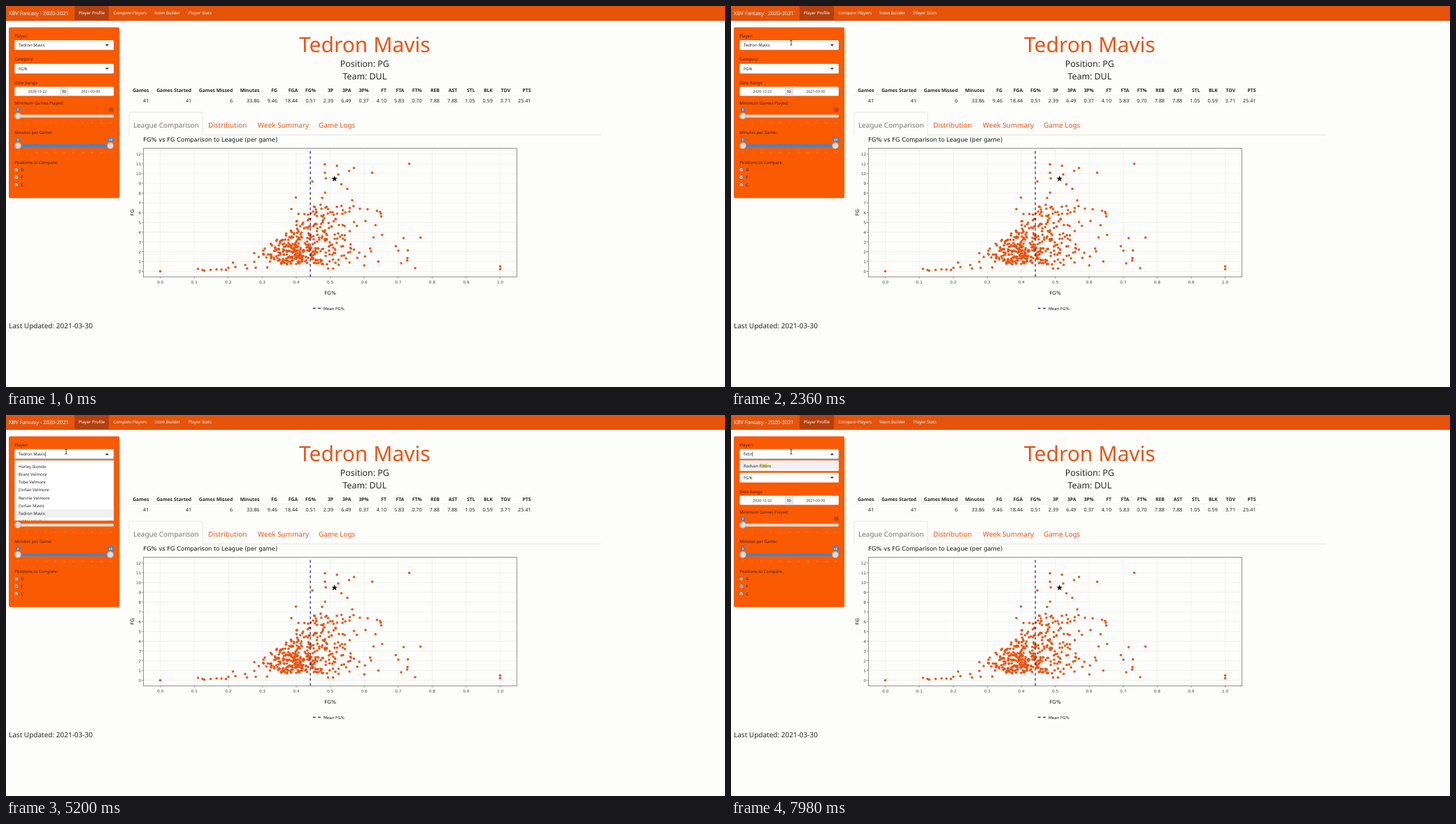
Write an HTML page that moves like this. It is 1028 px wide and 545 px high and loops after 8 s.

```html
<!DOCTYPE html>
<html lang="en">
<head>
<meta charset="utf-8">
<title>Player dashboard</title>
<style>
  html, body { margin: 0; width: 100%; height: 100%; overflow: hidden; background: #fdfdfc; }
  svg { display: block; width: 100%; height: 100%; }
  text { font-family: "Noto Sans", "Open Sans", sans-serif; text-rendering: geometricPrecision; white-space: pre; }
  .chart text { font-family: "DejaVu Sans", Verdana, sans-serif; }
</style>
</head>
<body>
<svg id="stage" viewBox="0 0 1028 545" preserveAspectRatio="none"></svg>
<script>
const LOOP = 8000;
const INK = '#262626', ORANGE = '#ea5412', PANEL = '#fa5a02', BLUE = '#3b87cf', LABEL = '#3c2212';
const NAME = 'Tedron Mavis', MATCH = 'Rodvan Fittiro', QUERY = 'fittir';
const stage = document.getElementById('stage');

function el(parent, tag, attrs = {}, content) {
  const node = document.createElementNS('http://www.w3.org/2000/svg', tag);
  for (const key in attrs) node.setAttribute(key, attrs[key]);
  if (content !== undefined) node.textContent = content;
  parent.appendChild(node);
  return node;
}
const group = (parent, attrs) => el(parent, 'g', attrs);
const rect = (parent, x, y, width, height, fill, more) =>
  el(parent, 'rect', { x, y, width, height, fill, ...more });
const line = (parent, x1, y1, x2, y2, stroke, more) =>
  el(parent, 'line', { x1, y1, x2, y2, stroke, ...more });
const text = (parent, x, y, size, content, fill = INK, anchor = 'start', more) =>
  el(parent, 'text', { x, y, 'font-size': size, fill, 'text-anchor': anchor, ...more }, content);
const show = (node, on) => node.setAttribute('display', on ? 'inline' : 'none');

function seeded(seed) {
  return () => {
    seed = (seed * 1664525 + 1013904223) % 4294967296;
    return seed / 4294967296;
  };
}

function drawNavbar() {
  const g = group(stage);
  rect(g, 0, 0, 1028, 21, '#e6530b');
  rect(g, 0, 20.3, 1028, 0.9, '#cb460e');
  rect(g, 98, 0, 49, 20.5, '#b4400f');
  text(g, 4, 13, 7.5, 'XBV Fantasy - 2020-2021', '#fff');
  [[104, 'Player Profile'], [153.5, 'Compare Players'], [212, 'Team Builder'], [261, 'Player Stats']]
    .forEach(([x, label]) => text(g, x, 12.4, 6, label, '#fff'));
}

function drawSlider(g, y, max, full) {
  const badge = { rx: 1 };
  rect(g, 12, y - 1.8, 142, 4, full ? BLUE : '#eadfd9', { rx: 1.5 });
  rect(g, 14.8, y - 12, 4.6, 6.4, BLUE, badge);
  text(g, 17.1, y - 7, 4.6, '0', '#fff', 'middle');
  rect(g, full ? 145.2 : 147, y - 12, full ? 8.6 : 7, 6.4, full ? BLUE : '#cf5019', badge);
  text(g, full ? 149.5 : 150.5, y - 7, 4.6, max, full ? '#fff' : '#7b3414', 'middle');
  for (let i = 0; i <= 10; i++) {
    const x = 17 + i * 13.25;
    line(g, x, y + 5, x, y + 7.3, '#d8713c', { 'stroke-width': 0.5 });
    text(g, x, y + 11.3, 3.6, Math.round(max * i / 10), '#d98a62', 'middle');
  }
  (full ? [17, 149.2] : [17]).forEach(cx =>
    el(g, 'circle', { cx, cy: y, r: 4.5, fill: '#dcdcda', stroke: '#a9a5a2', 'stroke-width': 0.6 }));
}

function drawSidebar() {
  const g = group(stage);
  rect(g, 4, 30.4, 158.2, 244.4, PANEL, { rx: 2 });
  [[44.6, 'Player:'], [78, 'Category:'], [111.5, 'Date Range'], [141, 'Minimum Games Played:'],
   [183.2, 'Minutes per Game:'], [225.6, 'Positions to Compare:']]
    .forEach(([y, label]) => text(g, 12.2, y, 6, label, LABEL));
  rect(g, 12.3, 82.8, 141.7, 13.8, '#fff', { rx: 1.6 });
  text(g, 18, 91.9, 6, 'FG%');
  el(g, 'path', { d: 'M142 88.4h5l-2.5 2.7z', fill: INK });
  rect(g, 12.3, 115.6, 141.7, 13, '#fff', { rx: 1.6 });
  rect(g, 77.3, 115.6, 11.6, 13, '#e9e7e6', { stroke: '#cfcac6', 'stroke-width': 0.4 });
  text(g, 44.8, 124, 5.1, '2020-12-22', INK, 'middle');
  text(g, 83.1, 124, 6, 'to', INK, 'middle');
  text(g, 121, 124, 5.1, '2021-03-30', INK, 'middle');
  drawSlider(g, 157.3, 35, false);
  drawSlider(g, 199.7, 48, true);
  ['G', 'F', 'C'].forEach((label, i) => {
    const y = 231.9 + i * 10.7;
    rect(g, 12.6, y, 4.3, 4.3, '#fff', { rx: 0.7, stroke: '#5a4a42', 'stroke-width': 0.4 });
    el(g, 'path', { d: `M13.5 ${y + 2.2}l1 1.1l1.7-2.3`, fill: 'none', stroke: '#111', 'stroke-width': 0.8 });
    text(g, 21.3, y + 4.2, 5.8, label, LABEL);
  });
}

function drawProfile() {
  const g = group(stage);
  text(g, 512.8, 66, 30, NAME, ORANGE, 'middle');
  text(g, 512.8, 87, 12.4, 'Position: PG', INK, 'middle');
  text(g, 512.8, 105.4, 12.4, 'Team: DUL', INK, 'middle');
  const heads = 'Games,Games Started,Games Missed,Minutes,FG,FGA,FG%,3P,3PA,3P%,FT,FTA,FT%,REB,AST,STL,BLK,TOV,PTS'.split(',');
  const values = '41 41 6 33.86 9.46 18.44 0.51 2.39 6.49 0.37 4.10 5.83 0.70 7.88 7.88 1.05 0.59 3.71 25.41'.split(' ');
  const edges = [204.3, 265.2, 324.2, 362.4, 388, 417.2];
  heads.forEach((head, i) => {
    const x = i < 6 ? edges[i] : i === 18 ? 750.4 : 442.8 + (i - 6) * 25.3;
    text(g, x, 122.6, 6.8, head, INK, 'end', { 'font-weight': 700 });
    text(g, x, 138, 7.2, values[i], INK, 'end');
  });
  line(g, 176, 127.6, 755, 127.6, '#f0efed', { 'stroke-width': 0.7 });
  el(g, 'path', {
    d: 'M281 184.5H850.5M176 184.5V154q0-2 2-2H279q2 0 2 2V184.5',
    fill: 'none', stroke: '#dfe0e1', 'stroke-width': 0.8
  });
  [[182, 'League Comparison', '#797673'], [289, 'Distribution', ORANGE],
   [360, 'Week Summary', ORANGE], [447, 'Game Logs', ORANGE]]
    .forEach(([x, label, fill]) => text(g, x, 174.4, 9.95, label, fill));
  text(g, 4, 460.6, 10, 'Last Updated: 2021-03-30');
}

// Highest dot (smallest y) allowed at a given x inside the crowd.
function crowdTop(x) {
  if (x < 400) return 354 - (x - 352) * 0.78;
  if (x < 456) return 316 - (x - 400) * 1.32;
  if (x < 480) return 243 + (x - 456) * 0.7;
  return 260 + (x - 480) * 1.15;
}

function drawDots(g) {
  const edge = [
    220.5,379.5, 706.5,372.5, 706.5,376.5, 576.5,225.7, 523.6,238.5, 456,226.5, 473.2,228.6, 490.5,236,
    497.5,231.7, 456,238.6, 475,241, 592.6,331.3, 568.5,332, 557.4,343.6, 574.6,349.6, 561,350,
    574,360.6, 573.6,364, 565,368, 585,375, 530.4,293, 534.8,294.5, 536,297, 536.5,301,
    517,290.7, 506,290, 491,294, 491.5,289, 479.5,286, 495,278, 488,261.5, 479.5,255,
    537.8,327.5, 525.5,331, 528.3,313.5, 514,307.5, 497.5,309, 512.3,371, 532.3,365.6, 460.5,375.5,
    467.6,375.5, 274.5,376, 281,377.4, 283.4,378.4, 292.6,377.6, 301,376.8, 308,377, 314.5,377.6,
    318,374.4, 324.6,367, 328,373.6, 342,370.6, 344.6,375.6, 355,353.4, 355,366, 357,374.4,
    368,350, 370,347, 368.5,355.5, 373.5,374, 386.5,336, 414.5,274, 408,290.5, 438,251
  ];
  const random = seeded(2021);
  const dot = (cx, cy) => el(g, 'circle', { cx: cx.toFixed(1), cy: cy.toFixed(1), r: 1.75 });
  for (let i = 0; i < edge.length; i += 2) dot(edge[i], edge[i + 1]);
  for (let count = 0; count < 385;) {
    const bell = random() + random() + random() + random() - 2;
    const x = 427 + bell * (bell > 0 ? 62 : 42), height = random() * Math.sqrt(random());
    if (x < 345 || x > 530) continue;
    dot(x, 371 - random() * 3 - (368 - crowdTop(x)) * height);
    count++;
  }
}

function drawChart() {
  const g = group(stage, { class: 'chart' });
  const px = v => 220.7 + v * 485.8, py = v => 379.5 - v * 13.97;
  text(g, 196.3, 193.8, 8.4, 'FG% vs FG Comparison to League (per game)', '#111');
  for (let i = 0; i <= 10; i++) {
    const x = px(i / 10);
    line(g, x, 204, x, 387, '#ededeb', { 'stroke-width': 0.7 });
    line(g, x, 387.5, x, 389.7, '#555', { 'stroke-width': 0.6 });
    text(g, x, 396.6, 5.7, (i / 10).toFixed(1), '#444', 'middle');
  }
  for (let i = 0; i <= 12; i++) {
    const y = py(i);
    line(g, 197, y, 730, y, '#ededeb', { 'stroke-width': 0.7 });
    line(g, 194, y, 196.4, y, '#555', { 'stroke-width': 0.6 });
    text(g, 193.2, y + 2.1, 5.7, i, '#444', 'end');
  }
  drawDots(group(g, { fill: ORANGE }));
  const dashed = { 'stroke-width': 1.2, 'stroke-dasharray': '3.67' };
  line(g, 435.1, 387.4, 435.1, 204, '#1f1870', dashed);
  const star = Array.from({ length: 10 }, (_, i) => {
    const r = i % 2 ? 1.8 : 4.6, a = i * Math.PI / 5;
    return `${469.7 + r * Math.sin(a)},${247.2 - r * Math.cos(a)}`;
  });
  el(g, 'polygon', { points: star.join(' '), fill: '#000' });
  rect(g, 196.4, 203.6, 534.2, 184, 'none', { stroke: '#777', 'stroke-width': 0.8 });
  text(g, 463.5, 412.8, 7.2, 'FG%', '#111', 'middle');
  text(g, 0, 0, 7, 'FG', '#111', 'middle', { transform: 'translate(182.6 295.3) rotate(-90)' });
  line(g, 438.8, 432.4, 450.4, 432.4, '#1f1870', dashed);
  text(g, 454, 434.5, 5.6, 'Mean FG%', '#111');
}

function makeField() {
  const g = group(stage);
  const box = rect(g, 12.3, 49, 141.7, 13.8, '#fff', { rx: 1.6, 'stroke-width': 0.9 });
  const value = text(g, 18, 58.2, 6, NAME);
  const caret = rect(g, 0, 52.8, 0.6, 6.6, '#111');
  const arrow = el(g, 'path', { fill: INK });
  return { box, value, caret, arrow };
}

function makeRows(parent, names, firstY) {
  const g = group(parent);
  names.forEach((name, i) => text(g, 18, firstY + i * 11.15, 6, name));
  return g;
}

function makeDropdown() {
  const clip = el(el(stage, 'defs'), 'clipPath', { id: 'listClip' });
  rect(clip, 12.3, 65, 141.7, 86, '#000');
  const list = group(stage);
  rect(list, 12.3, 65, 141.7, 86, '#fff');
  const inner = group(list, { 'clip-path': 'url(#listClip)' });
  const active = rect(inner, 12.3, 0, 141.7, 11.2, '#f1f0f2');
  const top = makeRows(inner, ['Gracious Obelumi', 'Kaylor Orven', 'Marlin Orven', 'Tek Olubari',
    'DeWendel Hartwick', 'Jo-Venn Fennimore', 'Dariell Fennimore-Potter', 'Colburn Avery'], 74.7);
  const middle = makeRows(inner, ['Sorel Indrick', 'Harley Ikondo', 'Brant Velmore', 'Tobe Velmore',
    'Corlan Velmore', 'Rennie Velmore', 'Corlan Mavis', NAME, 'JoMont Kellwin'], 64.8);
  const bar = rect(inner, 148.8, 97.4, 4, 13.2, '#7d7d7d', { rx: 2 });
  rect(list, 12.3, 65, 141.7, 86, 'none', { stroke: '#cfc6c0', 'stroke-width': 0.6 });

  const result = group(stage);
  rect(result, 12.3, 65, 141.7, 15, '#fff', { stroke: '#cfc6c0', 'stroke-width': 0.6 });
  rect(result, 12.6, 67, 141.1, 11.2, '#f1f0f2');
  const mark = rect(result, 0, 69, 0, 7.2, '#f7ec9a');
  const label = text(result, 18, 74.7, 6, MATCH);
  return { list, active, top, middle, bar, result, mark, label };
}

drawNavbar();
drawSidebar();
drawProfile();
drawChart();
const field = makeField();
const drop = makeDropdown();
const pointer = el(stage, 'path', {
  d: 'M0 0V7.6L1.8 6L3.1 8.8L4.4 8.2L3.1 5.5H5.4Z', fill: '#000', stroke: '#fff', 'stroke-width': 0.6
});
const beam = el(stage, 'path', {
  d: 'M-1.6-3.6Q0-3.6 0-2.6Q0-3.6 1.6-3.6M0-2.8V2.8M-1.6 3.6Q0 3.6 0 2.6Q0 3.6 1.6 3.6',
  fill: 'none', stroke: '#111', 'stroke-width': 0.8
});

const OPEN = 2860, SCROLL = 3600, CLEAR = 5400, FILTER = 6700;
const KEYS = [5900, 6080, 6620, 6980, 7480, 7820];
const PATH = [[0, 112, -12], [350, 112, -12], [820, 103, 12], [1480, 95.6, 35.5],
  [1660, 95.6, 35.5], [2080, 86, 52.6], [LOOP, 86, 52.6]];

function pathAt(t) {
  const i = PATH.findIndex((p, k) => k && t <= p[0]);
  const [t0, x0, y0] = PATH[i - 1], [t1, x1, y1] = PATH[i];
  const u = (t - t0) / (t1 - t0), ease = u * u * (3 - 2 * u);
  return [x0 + (x1 - x0) * ease, y0 + (y1 - y0) * ease];
}

function render(t) {
  const open = t >= OPEN, typed = KEYS.filter(k => t >= k).length;
  const [x, y] = pathAt(t), overField = y > 48;
  show(pointer, !overField);
  show(beam, overField);
  (overField ? beam : pointer).setAttribute('transform', `translate(${x} ${y})`);

  field.value.textContent = t < CLEAR ? NAME : QUERY.slice(0, typed);
  field.box.setAttribute('stroke', open ? '#9fb4cf' : 'none');
  field.arrow.setAttribute('d', open ? 'M142 57.2h5l-2.5-2.7z' : 'M142 54.8h5l-2.5 2.7z');
  const end = field.value.textContent ? field.value.getComputedTextLength() : 0;
  field.caret.setAttribute('x', 18.4 + end);
  show(field.caret, open && (t >= CLEAR || (t - OPEN) % 1000 < 500));

  const scrolled = t >= SCROLL;
  show(drop.list, open && t < FILTER);
  show(drop.top, !scrolled);
  show(drop.middle, scrolled);
  show(drop.active, scrolled);
  drop.active.setAttribute('y', t < CLEAR ? 135.2 : 124.1);
  drop.bar.setAttribute('opacity', scrolled ? Math.max(0, Math.min(1, (4900 - t) / 250)) : 0);

  show(drop.result, t >= FILTER);
  if (t >= FILTER) {
    const start = MATCH.indexOf(' ') + 1;
    drop.mark.setAttribute('x', drop.label.getStartPositionOfChar(start).x);
    drop.mark.setAttribute('width', drop.label.getSubStringLength(start, typed));
  }
}

function frame() {
  render(performance.now() % LOOP);
  requestAnimationFrame(frame);
}
frame();
</script>
</body>
</html>
```
